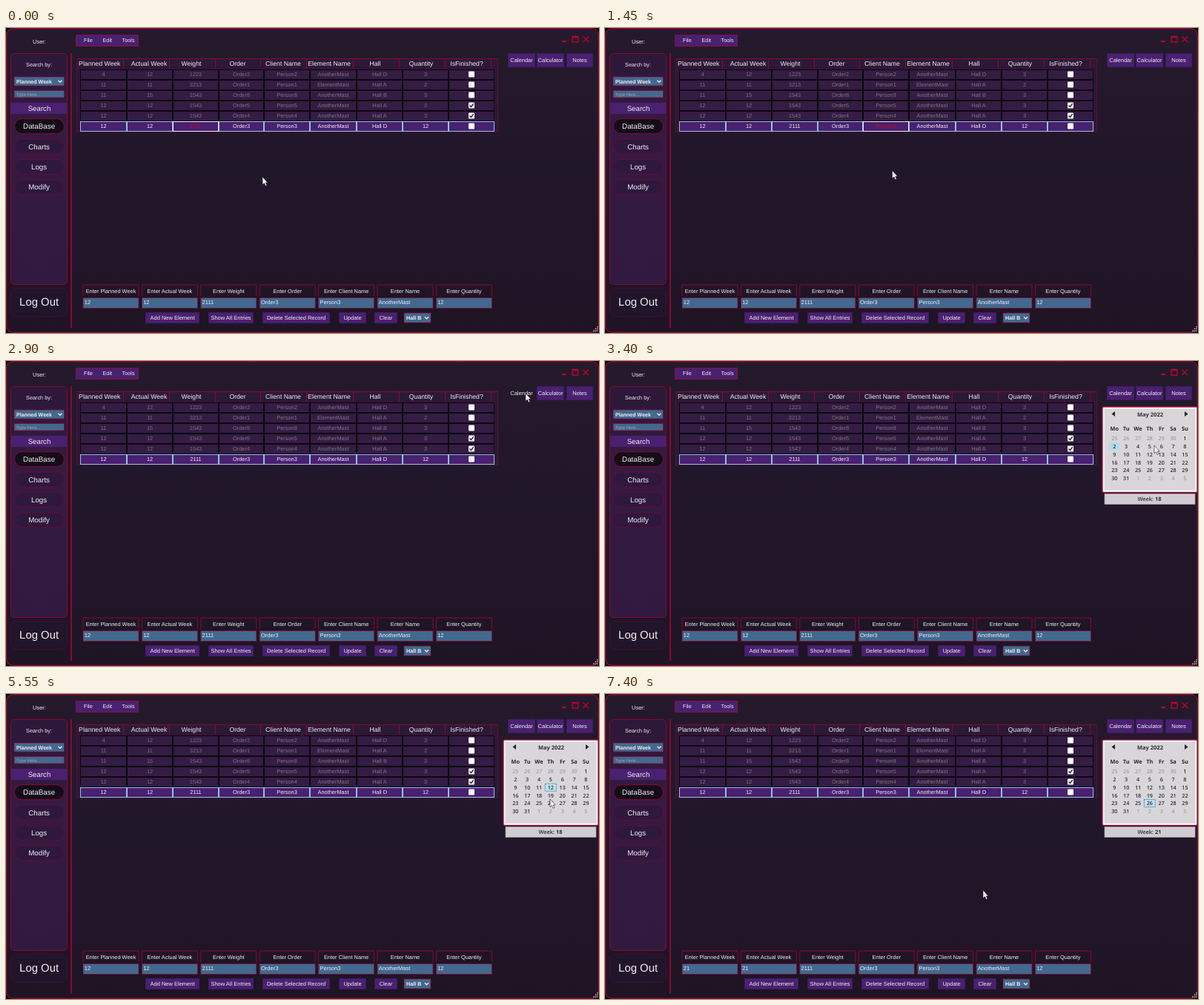
An HTML page that plays this animation: 800x412 px, repeating every 7550 ms.

```html
<!DOCTYPE html>
<html lang="en">
<head>
<meta charset="utf-8">
<title>Weekly planner</title>
<style>
  html, body { margin: 0; width: 100%; height: 100%; overflow: hidden; background: #08050a; }
  svg { display: block; width: 100%; height: 100%; font-family: "Liberation Sans", Arial, sans-serif; text-rendering: geometricPrecision; }
  .cal { font-family: "Open Sans", "Noto Sans", sans-serif; }
</style>
</head>
<body>
<svg id="stage" viewBox="0 0 800 412" xmlns="http://www.w3.org/2000/svg"></svg>
<script>
const LOOP = 7550;
const RED = '#8c0734', DIM = '#640c34', PURPLE = '#4a2070', BLUE = '#42698e', CYAN = '#8fc4e4';

const attrs = o => Object.entries(o).map(([k, v]) => ` ${k}="${v}"`).join('');
const rect = (x, y, w, h, fill, o = {}) =>
  `<rect x="${x}" y="${y}" width="${w}" height="${h}" fill="${fill}"${attrs(o)}/>`;
const path = (d, stroke, width = 1, o = {}) =>
  `<path d="${d}" fill="none" stroke="${stroke}" stroke-width="${width}"${attrs(o)}/>`;
const text = (s, x, y, size = 7.5, o = {}) =>
  `<text x="${x}" y="${y}" font-size="${size}"${attrs({ fill: '#f1edf4', ...o })}>${s}</text>`;
const mid = (s, x, y, size, o = {}) => text(s, x, y, size, { 'text-anchor': 'middle', ...o });
const button = (s, x, y, w, h, o = {}) =>
  `<g${attrs(o)}>${rect(x + .5, y + .5, w - 1, h - 1, PURPLE, { stroke: '#3f1b63' })}</g>` +
  mid(s, x + w / 2, y + h / 2 + 2.7, 7.5);
const chevron = (x, y) => path(`M${x - 2.5} ${y - 1.3}l2.5 2.6 2.5-2.6`, '#e8eef5', 1.3);
const input = (x, y, w, h) => rect(x, y, w, h, BLUE, { stroke: RED, 'stroke-width': .8 });

function frame() {
  const icon = '#b8042f';
  return `<defs>
    <linearGradient id="bg" x2="0" y2="1"><stop stop-color="#251a2c"/><stop offset=".45" stop-color="#21172a"/><stop offset="1" stop-color="#1e1424"/></linearGradient>
    <linearGradient id="side" x2="0" y2="1"><stop stop-color="#2c1838"/><stop offset=".35" stop-color="#351a42"/><stop offset="1" stop-color="#311a3f"/></linearGradient>
    </defs>` +
    rect(0, 0, 800, 412, '#08050a') +
    rect(.7, .7, 798.6, 410.6, 'url(#bg)', { rx: 9, stroke: RED, 'stroke-width': 1.4 }) +
    text('User:', 36, 20.6) +
    rect(94.5, 9.5, 84, 15, PURPLE, { stroke: '#8c0d45' }) +
    text('File', 105, 19.4, 7.3) + text('Edit', 130.5, 19.4, 7.3) + text('Tools', 156.5, 19.4, 7.3) +
    path('M750 18h6', icon, 2) +
    path('M764 11.5h8v7.5h-8zM764 12.5h8', icon, 1.3) +
    path('M778.5 11.5l7.5 7.5m0-7.5l-7.5 7.5', icon, 1.5) +
    path('M798 403v8M795.5 405.5v5.5M793 408v3', '#c4bec8', 1.4, { 'stroke-dasharray': '1.4 1.1' });
}

function sidebar() {
  const pills = ['DataBase', 'Charts', 'Logs', 'Modify'].map((s, i) => {
    const y = 132.7 + i * 27.4;
    return rect(11.5, y - 10, 67, 20, i ? '#2f183d' : '#140d19',
      { rx: 10, stroke: i ? DIM : RED }) + mid(s, 44.6, y + 3.5, 9.8);
  }).join('');
  return rect(6.5, 34.5, 76, 312, 'url(#side)', { rx: 5, stroke: RED }) +
    mid('Search by:', 44.5, 51.6, 7.3) +
    input(11, 66, 67.5, 12) + text('Planned Week', 14, 74.6, 7.1, { 'font-weight': 700 }) + chevron(73, 72) +
    input(11, 84.5, 67.5, 9.5) + text('Type Here...', 14, 91.5, 6, { fill: '#a0a0aa' }) +
    rect(7, 101, 75, 15, PURPLE) + mid('Search', 45, 112, 9.7) + pills +
    rect(6.5, 351.5, 76, 38, '#20152a', { rx: 8, stroke: '#4a0d2e' }) +
    mid('Log Out', 44.6, 375.2, 14.9) +
    path('M88 34V405', RED, 2);
}

const edges = [100, 163, 225, 287, 348, 410, 473, 535, 597, 659];
const heads = [['Planned Week', 126.3], ['Actual Week', 193], ['Weight', 250], ['Order', 312.5], ['Client Name', 374],
  ['Element Name', 436], ['Hall', 498], ['Quantity', 560], ['IsFinished?', 621.5]];
const rows = [
  '4 12 1223 2 AnotherMast D 3', '11 11 3213 1 ElementMast A 2', '11 15 1543 8 AnotherMast B 3',
  '12 12 1543 5 AnotherMast A 3', '12 12 1543 4 AnotherMast A 3', '12 12 2111 3 AnotherMast D 12'
].map(r => {
  const [plan, actual, weight, n, item, hall, count] = r.split(' ');
  return [plan, actual, weight, 'Order' + n, 'Person' + n, item, 'Hall ' + hall, count];
});

function table() {
  const center = c => (edges[c] + edges[c + 1]) / 2;
  let out = rect(95.5, 41.5, 568, 98.5, '#2b1937', { stroke: DIM });
  heads.forEach(([s, x], c) => {
    out += path(`M${edges[c + 1] - 4.5} 42v13`, RED) + mid(s, x, 51.4, 8.7);
  });
  out += path('M96 41.5h567', RED) + path('M96 55.5h567', '#3e0f2e');
  rows.forEach((cells, r) => {
    const y = 56 + r * 14, on = r === 5;
    for (let c = 0; c < 9; c++) {
      out += rect(edges[c] + .5, y + .5, edges[c + 1] - edges[c] - 1, 13, on ? PURPLE : '#341c43',
        { stroke: on ? CYAN : '#0b070f' });
      if (c < 8) out += mid(cells[c], center(c), y + 9.1, 7.4, { fill: on ? '#f1edf4' : '#7d7483' });
    }
    out += rect(624, y + 2.5, 8, 8, '#fff', { rx: 1 });
    if (r === 3 || r === 4) out += path(`M625.5 ${y + 6.5}l2 2 3.2-4.4`, '#222', 1.4);
  });
  const edit = c => `<g id="edit${c}">` +
    rect(edges[c] + .5, 126.5, edges[c + 1] - edges[c] - 1, 13, PURPLE, { stroke: '#e6edf4' }) +
    mid(rows[5][c], center(c), 135.1, 7.4, { fill: '#c4082f' }) + '</g>';
  return out + edit(2) + edit(4);
}

function form() {
  const names = ['Planned Week', 'Actual Week', 'Weight', 'Order', 'Client Name', 'Name', 'Quantity'];
  const values = ['12', '12', '2111', 'Order3', 'Person3', 'AnotherMast', '12'];
  const fields = names.map((s, i) => {
    const x = 104 + i * 79.4;
    return path(`M${x} 362v-15h75v15`, RED) +
      mid('Enter ' + s, x + 37.5, 357.5, 7.4) +
      input(x, 364.5, 75, 14) +
      text(values[i], x + 1.8, 372.8, 7.5, { id: 'field' + i });
  }).join('');
  const actions = [['Add New Element', 188, 73], ['Show All Entries', 273, 61], ['Delete Selected Record', 346, 91],
    ['Update', 449, 37], ['Clear', 497, 31]];
  return fields + actions.map(([s, x, w]) => button(s, x, 384, w, 15)).join('') +
    input(537, 385, 36, 13) + text('Hall B', 540, 393.8, 7.2, { 'font-weight': 700 }) + chevron(567.5, 391.5);
}

const dayX = i => 687.3 + (i % 7) * 15.85;
const dayY = i => 104.8 + Math.floor(i / 7) * 10.7;

function calendar() {
  let days = '';
  for (let i = 0; i < 42; i++) {
    const n = i - 5, inside = n > 0 && n < 32;
    days += mid(n < 1 ? n + 30 : inside ? n : n - 31, dayX(i), dayY(i) + 2.6, 7.2,
      { fill: inside ? '#302d33' : '#8d8991', 'font-weight': inside ? 600 : 400 });
  }
  const week = ['Mo', 'Tu', 'We', 'Th', 'Fr', 'Sa', 'Su'].map((s, i) =>
    mid(s, dayX(i), 94.2, 7.4, { fill: '#2a272d', 'font-weight': 700 })).join('');
  return `<g id="calendar" class="cal">` +
    rect(671, 62, 128, 115.5, '#d9d6da', { rx: 2, stroke: '#a40c3e', 'stroke-width': 1.6 }) +
    rect(672.7, 63.7, 124.6, 112, 'none', { stroke: '#fbf9fb', 'stroke-width': 1.8 }) +
    '<path d="M688 68v7l-4.5-3.5zM782 68v7l4.5-3.5z" fill="#252228"/>' +
    mid('May 2022', 735.5, 74.5, 7.5, { fill: '#302d33', 'font-weight': 700 }) + week +
    rect(0, 0, 15, 10, '#b9dbe8', { id: 'pick', 'stroke-dasharray': '2 1' }) + days +
    rect(674, 179.5, 122, 14, '#d0cdd2', { stroke: '#a9a3ad', 'stroke-width': .7 }) +
    `<text x="734.5" y="189.2" font-size="7.4" fill="#302d33" text-anchor="middle" font-weight="600">Week: <tspan id="week" font-weight="700">18</tspan></text></g>`;
}

const tools = button('Calendar', 677, 34, 37, 19, { id: 'calButton' }) +
  button('Calculator', 716, 34, 37, 19) + button('Notes', 756, 34, 36, 19);
const pointer = '<path id="pointer" d="M0 0V10.8L2.4 8.6 4.2 12.4 5.9 11.6 4.2 8H7.2Z" fill="#fff" stroke="#15101a" stroke-width=".6"/>';

document.getElementById('stage').innerHTML =
  frame() + sidebar() + table() + tools + form() + calendar() + pointer;

const el = id => document.getElementById(id);
const show = (id, on) => el(id).setAttribute('visibility', on ? 'visible' : 'hidden');

// time, x, y of the pointer tip
const track = [
  [0, 346, 201], [750, 377, 131], [1050, 377, 131], [1450, 387.5, 192.5], [1850, 388, 193],
  [2600, 700, 43], [2950, 701, 43.5], [3400, 741, 114], [3700, 734.5, 126], [4250, 734.5, 126],
  [4700, 508, 279], [4900, 506, 281], [5100, 506, 281], [5550, 734, 142], [5800, 734, 142],
  [6150, 510, 265], [LOOP, 510, 265]
];

function pointerAt(t) {
  const i = track.findIndex(k => k[0] > t);
  const [a, b] = [track[i - 1], track[i]];
  const p = (t - a[0]) / (b[0] - a[0]), e = p * p * (3 - 2 * p);
  return [1, 2].map(n => a[n] + (b[n] - a[n]) * e);
}

function draw(t) {
  t = Math.floor(t / 50) * 50;
  show('edit2', t < 850);
  show('edit4', t >= 850 && t < 1850);
  show('calButton', t < 2550 || t >= 3100);
  show('calendar', t >= 3050);

  const day = t < 3850 ? 2 : t < 5750 ? 12 : 26;
  const i = day + 5, pick = el('pick');
  pick.setAttribute('x', dayX(i) - 7.5);
  pick.setAttribute('y', dayY(i) - 5);
  pick.setAttribute('stroke', day === 2 ? 'none' : '#2c93bd');
  pick.setAttribute('fill', day === 2 ? '#b3dbea' : '#c4e0ea');

  const late = t >= 5750;
  el('week').textContent = late ? 21 : 18;
  el('field0').textContent = el('field1').textContent = late ? 21 : 12;

  const [x, y] = pointerAt(t);
  el('pointer').setAttribute('transform', `translate(${x.toFixed(1)} ${y.toFixed(1)})`);
}

const start = performance.now();
function tick() {
  draw((performance.now() - start) % LOOP);
  requestAnimationFrame(tick);
}
draw(0);
requestAnimationFrame(tick);
</script>
</body>
</html>
```
